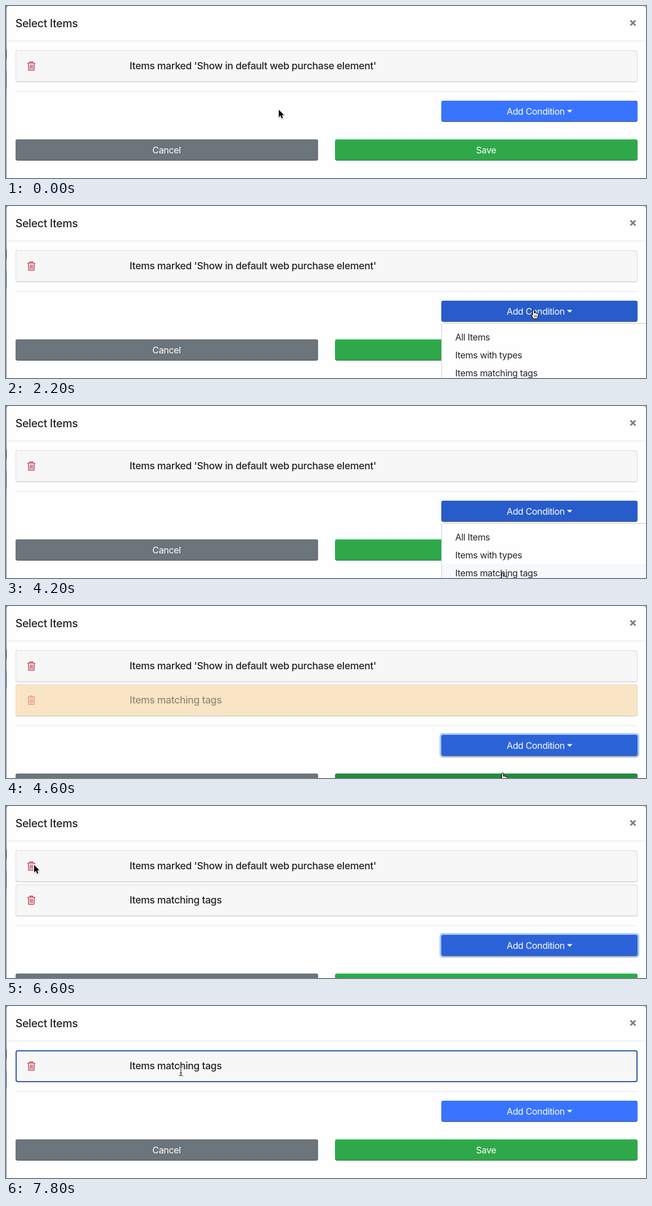
An HTML page with a canvas that plays this animation: 1138x307 px, repeating every 8 s.

```html
<!DOCTYPE html>
<html lang="en">
<head>
<meta charset="utf-8">
<title>Select Items</title>
<style>
  html, body { margin: 0; width: 100%; height: 100%; overflow: hidden; background: #fefefe; }
  canvas { display: block; width: 1138px; height: 307px; }
</style>
</head>
<body>
<canvas id="stage"></canvas>
<script>
const W = 1138, H = 307, LOOP = 8000, STEP = 200;
const MENU_OPEN = 2000, ROW_ADDED = 4400, ROW_DELETED = 6800, ROW_GONE = 7400;
const LEFT = 17, FULL = 1106, PAPER = '#fefefe', INK = '#212529', RED = '#c03a4b';
const TAGS = 'Items matching tags';
const MARKED = "Items marked 'Show in default web purchase element'";

const canvas = document.getElementById('stage');
const ctx = canvas.getContext('2d');
const dpr = window.devicePixelRatio || 1;
canvas.width = W * dpr;
canvas.height = H * dpr;

const home = { x: 485, y: 185 };
const moves = [
  { start: 200, end: 1400, x: 938, y: 185 },
  { start: 2200, end: 3200, x: 883, y: 298 },
  { start: 4600, end: 5000, x: 633, y: 217 },
  { start: 5000, end: 6200, x: 50, y: 105 },
  { start: 7000, end: 7800, x: 311, y: 116.5 }
];

const clamp = v => Math.min(1, Math.max(0, v));
const ramp = (t, start, end) => clamp((t - start) / (end - start));
const ease = p => p * p * (3 - 2 * p);
const lerp = (a, b, p) => a + (b - a) * p;

function pointerAt(t) {
  let { x, y } = home;
  for (const m of moves) {
    const p = ease(ramp(t, m.start, m.end));
    x = lerp(x, m.x, p);
    y = lerp(y, m.y, p);
  }
  return { x, y };
}

function mix(a, b, p) {
  return `rgb(${a.map((v, i) => Math.round(lerp(v, b[i], p))).join(',')})`;
}

function rect(x, y, w, h, color) {
  ctx.fillStyle = color;
  ctx.fillRect(x, y, w, h);
}

function box(x, y, w, h, r, fill) {
  ctx.beginPath();
  ctx.roundRect(x, y, w, h, r);
  ctx.fillStyle = fill;
  ctx.fill();
}

function stroke(path, color, width) {
  ctx.strokeStyle = color;
  ctx.lineWidth = width;
  ctx.stroke(new Path2D(path));
}

function at(x, y, draw) {
  ctx.save();
  ctx.translate(x, y);
  ctx.lineJoin = 'round';
  draw();
  ctx.restore();
}

function text(str, x, y, color, size = 16, weight = 400, spacing = -0.34) {
  ctx.font = `${weight} ${size}px Inter, "Open Sans", sans-serif`;
  ctx.letterSpacing = spacing + 'px';
  ctx.fillStyle = color;
  ctx.fillText(str, x, y);
}

function drawFrame() {
  rect(0, 0, W, H, '#777779');
  rect(0, 78, 1, 16, '#111');
  rect(0, 115, 1, 32, '#17455f');
  box(1, 0, W - 1, H + 8, 4, PAPER);
  text('Select Items', 16.7, 38, INK, 19.5, 500, -0.33);
  at(1114.8, 30.2, () => stroke('M-4.5-4.5L4.5 4.5M4.5-4.5L-4.5 4.5', '#7d7d7d', 2.9));
  rect(1, 62, W - 1, 1, '#e5e5e6');
}

function drawTrash(mid) {
  at(45, mid - 0.2, () => {
    stroke('M-6.9-5.4H6.9M-2.4-5.7V-7.6H2.4V-5.7M-5.3-5L-4.8 7.2H4.8L5.3-5', RED, 1.4);
    for (const x of [-2.2, 0, 2.2]) rect(x - 0.6, -2.8, 1.2, 7.8, RED);
  });
}

function drawRow(y, h, label, { tint = 0, alpha = 1, selected = false, chevron = false } = {}) {
  const fill = mix([247, 247, 248], [249, 229, 198], tint);
  if (selected) {
    box(LEFT, y, FULL, h, 4, '#2b5aa8');
    box(LEFT + 2, y + 2, FULL - 4, h - 4, 2, fill);
  } else {
    box(LEFT, y, FULL, h, 4, mix([205, 206, 209], [210, 203, 190], tint));
    box(LEFT, y, FULL, h - 1, 4, mix([222, 222, 225], [234, 216, 182], tint));
    box(LEFT + 1, y + 1, FULL - 2, h - 2.5, 3, fill);
  }
  const mid = y + h / 2;
  ctx.globalAlpha = alpha;
  drawTrash(mid);
  text(label, 219.8, mid + 5.5, INK, 17.6, 500);
  if (chevron) at(1048, mid, () => stroke('M-6.2 3.6L0-2.6L6.2 3.6', '#34383c', 2.4));
  ctx.globalAlpha = 1;
}

function drawButton(x, y, w, fill, base, label, labelX, shine = fill) {
  box(x, y, w, 38, 4, base);
  box(x, y, w, 30, 4, shine);
  box(x, y + 1, w, 35.8, 4, fill);
  text(label, labelX, y + 25, '#fff');
}

function drawActions(shift, { blue, focus, saveHover }) {
  rect(LEFT, 152 + shift, FULL, 1, '#e6e6e7');
  const y = 169 + shift, foot = 238 + shift;
  if (focus) {
    box(771, y - 3, 355, 44, 6, '#c5ccd8');
    box(771, y - 3, 355, 42, 6, '#a3cbf6');
  }
  drawButton(774, y, 349, blue, '#56637f', 'Add Condition', 890.2);
  ctx.fillStyle = '#fff';
  at(1002.3, y + 16.5, () => ctx.fill(new Path2D('M-4.8 0H4.8L0 4.8Z')));

  drawButton(LEFT, foot, 538, '#6c747c', '#565c62', 'Cancel', 260.3);
  const green = saveHover ? '#238b3d' : '#2fa84a';
  drawButton(585, foot, 538, green, '#3a7d4b', 'Save', 835.8, saveHover ? green : '#20d456');
}

function drawMenu(pointerY) {
  box(774, 209, 380, 120, 4, '#cbccce');
  box(775, 210, 380, 120, 3, PAPER);
  ['All Items', 'Items with types', TAGS].forEach((label, i) => {
    const top = 218 + i * 32;
    if (pointerY >= top && pointerY < top + 32) rect(775, top, W - 775, 32, '#f7f8fb');
    text(label, 798.8, top + 22, INK);
  });
}

const ARROW = 'M0 0V13.4L3.1 10.6L5.2 15.4L7.5 14.4L5.4 9.8H9.4Z';
const HAND = 'M-1.6 1Q0-1 1.4 1V6Q5-.5+6 5.4 6.4 7Q8.6 6.4 8.6 8.6V11L7.2 14.4V16H-1.2V14.4L-4.6 9.4Q-4.4 7.6-2.8 8.6L-1.6 9.8Z'
  .replace('Q5-.5+6 5.4', 'Q4 4.8');
const BEAM = 'M-3.5-8H-1.5L0-6.8L1.5-8H3.5M0-7V7M-3.5 8H-1.5L0 6.8L1.5 8H3.5M-2 3H2';

const pointers = {
  beam() {
    stroke(BEAM, '#fff', 2.6);
    stroke(BEAM, '#222', 1.1);
  },
  hand() {
    ctx.fillStyle = '#fff';
    ctx.fill(new Path2D(HAND));
    stroke(HAND, '#111', 1.2);
    for (const x of [1.2, 3.4, 5.6]) rect(x - 0.4, 10, 0.9, 3.4, '#111');
  },
  arrow() {
    ctx.shadowColor = 'rgba(0,0,0,.3)';
    ctx.shadowBlur = 2 * dpr;
    ctx.shadowOffsetY = dpr;
    stroke(ARROW, '#fff', 2);
    ctx.shadowColor = 'transparent';
    ctx.fillStyle = '#000';
    ctx.fill(new Path2D(ARROW));
  }
};

function pointerKind(t, { x, y }) {
  if (t > 7000 && x > 200) return 'beam';
  const onButton = t < MENU_OPEN && x >= 774 && y >= 169 && y < 207;
  return onButton || (t >= MENU_OPEN && t <= 4600) ? 'hand' : 'arrow';
}

// The new row fades in on yellow; the removed one fades out on it.
function secondRowStyle(t, deleted) {
  if (deleted) return { tint: 1, alpha: 0.9 - (t - ROW_DELETED) / 800, chevron: true };
  return { tint: 1 - ramp(t, 4600, 5020), alpha: lerp(0.2, 1, ramp(t, ROW_ADDED, 5000)) };
}

function render(t) {
  const pointer = pointerAt(t);
  const kind = pointerKind(t, pointer);
  const menu = t >= MENU_OPEN && t < ROW_ADDED;
  const second = t >= ROW_ADDED && t < ROW_GONE;
  const deleted = t >= ROW_DELETED;
  const focus = t >= ROW_ADDED && !deleted;
  const rowHeight = deleted ? 80 : 56;
  const blue = menu ? '#285ccb' : focus || kind === 'hand' ? '#2c63d9' : '#3974ff';

  ctx.setTransform(dpr, 0, 0, dpr, 0, 0);
  drawFrame();
  drawRow(79, 57, deleted ? TAGS : MARKED, { selected: deleted });
  if (second) drawRow(140, rowHeight + 1, TAGS, secondRowStyle(t, deleted));
  drawActions(second ? rowHeight + 5 : 0, { blue, focus, saveHover: focus && kind === 'hand' });
  if (menu) drawMenu(pointer.y);
  at(pointer.x, pointer.y, pointers[kind]);
}

function tick(now) {
  render(Math.floor((now % LOOP) / STEP) * STEP);
  requestAnimationFrame(tick);
}
render(0);
requestAnimationFrame(tick);
</script>
</body>
</html>
```
